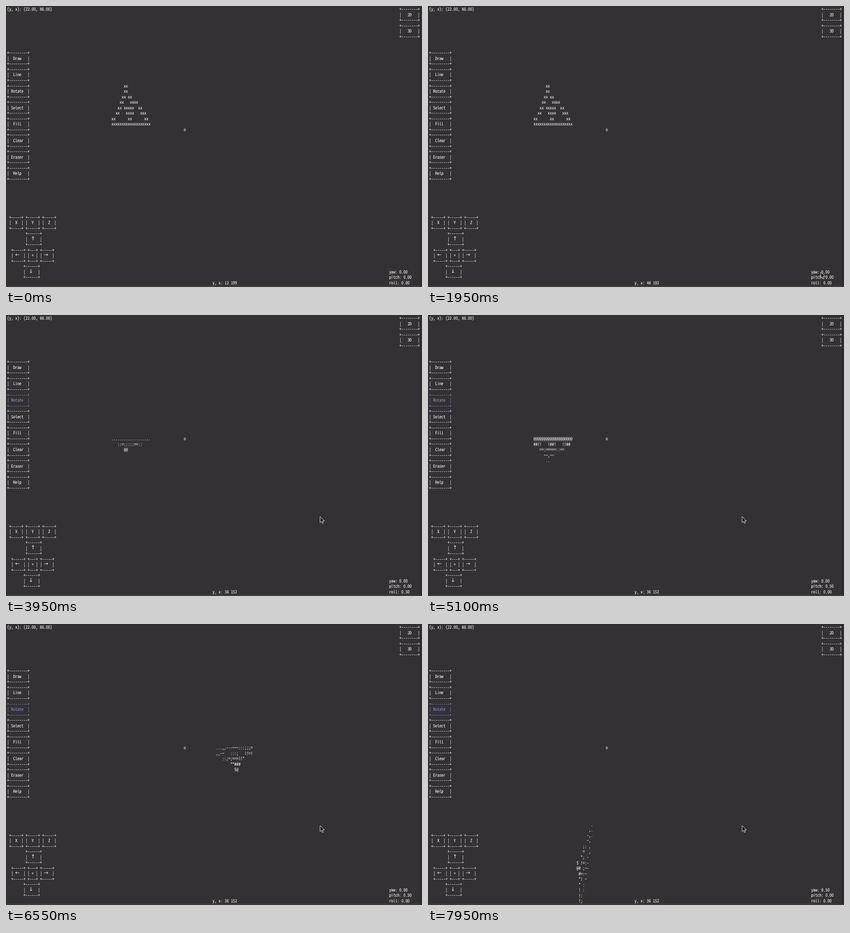
Write an HTML page that moves like this. It is 800 px wide and 541 px high and loops after 8 s.

```html
<!DOCTYPE html>
<html lang="en">
<head>
<meta charset="utf-8">
<title>Terminal sketch pad</title>
<style>
  html, body { margin: 0; width: 100%; height: 100%; overflow: hidden; background: #333133; }
  #stage {
    position: relative; width: 800px; height: 541px; overflow: hidden;
    background: #333133; color: #e6e4e4;
    font: 100px/10.54px "Noto Sans Mono CJK JP", "Noto Sans Mono CJK SC", "Noto Sans Mono", monospace;
    text-rendering: geometricPrecision; font-variant-ligatures: none;
  }
  #stage::after {
    content: ""; position: absolute; inset: 0; border: solid #2d2b2d;
    border-width: 1px 4px 3px 1px; border-bottom-color: #3d3b38;
  }
  pre { position: absolute; margin: 0; font: inherit; white-space: pre; -webkit-text-stroke: .12px; }
  .on { color: #8585b8; }
  .arrow { font-family: "DejaVu Sans", sans-serif; font-size: 10px; }
  #mouse { position: absolute; left: 0; top: 0; overflow: visible; z-index: 2; }
</style>
</head>
<body>
<div id="stage">
  <svg id="mouse" width="10" height="16">
    <path d="M0 0V11.6L2.7 9.2L4.5 13.3L6.4 12.5L4.6 8.5H8.3Z" fill="#161616" stroke="#e6e6e6" stroke-width=".9"/>
  </svg>
</div>
<script>
const LOOP = 8000, STEP = 50;
const CW = 3.95, RH = 10.54, LEFT = 2, TOP = 1;
const ROWS = 51, COLS = 201, CY = 22, CX = 86;
const RAMP = ".,-~:;=!*#$@";
const stage = document.getElementById("stage");
const mouse = document.getElementById("mouse");

function put(row, col, text, cls = "") {
  const el = document.createElement("pre");
  el.className = cls;
  el.style.left = LEFT + col * CW + "px";
  el.style.top = TOP + row * RH + "px";
  el.textContent = text;
  stage.append(el);
  return el;
}

function box(row, col, label) {
  const edge = "+" + "-".repeat(label.length) + "+";
  return put(row, col, `${edge}\n|${label}|\n${edge}`);
}

// Fit the font's advance to the character grid.
const probe = put(0, 0, "x".repeat(10));
const ratio = probe.getBoundingClientRect().width / 1000;
probe.remove();
const size = 8.4 * Math.sqrt(0.5 / ratio);
stage.style.fontSize = size + "px";
stage.style.letterSpacing = CW - ratio * size + "px";

const tools = {};
["  Draw   ", "  Line   ", " Rotate  ", " Select  ", "  Fill   ", "  Clear  ", " Eraser  ", "  Help   "]
  .forEach((label, i) => tools[label.trim()] = box(8 + 3 * i, 0, label));
["2D", "3D"].forEach((name, i) => box(3 * i, 191, `   ${name}   `));
[..."XYZ"].forEach((name, i) => box(38, 1 + 8 * i, `  ${name}  `));
box(41, 9, "      ");
box(44, 2, "     ");
box(44, 10, " + ");
box(44, 16, "     ");
box(47, 8, "      ");
put(42, 11.6, "↑", "arrow");
put(45, 4, "←", "arrow");
put(45, 17.9, "→", "arrow");
put(48, 10.6, "↓", "arrow");
put(0, 0, "(y, x): (22.00, 86.00)");
put(CY, CX, "o");

const figure = put(0, 0, "");
const counter = put(50, 100, "");
const yawText = put(48, 186, "");
const pitchText = put(49, 186, "");
const rollText = put(50, 186, "");

// Triangle, row by row, relative to the pivot.
const points = [];
[
  "      xx",
  "      xx",
  "     xx xx",
  "    xx   xxxx",
  "   xx xxxxx  xx",
  "  xx   xxxx   xxx",
  "xx      xx      xx",
  "x".repeat(19)
].forEach((line, r) => [...line].forEach((ch, c) => {
  if (ch === "x") points.push([51 + c - CX, 14 + r - CY]);
}));

const clamp = (v, lo, hi) => Math.min(hi, Math.max(lo, v));

// A key is tapped, then held: it repeats at a steady rate per ms.
const key = (tap, taps, from, to, count, rate) => t => t < from
  ? clamp(Math.round((t - tap) / 67) + 1, 0, taps)
  : Math.round(count + (Math.min(t, to) - from) * rate);

const rollKey = key(2950, 4, 3450, 4100, 5, 0.0575);
const pitchKey = key(5250, 1, 5550, 6550, 4, 0.052);
const yawKey = key(7250, 1, 7500, 7950, 2, 0.06);

// Pointer strokes: start, end, and where each one leads.
const strokes = [
  { from: 50, to: 250, x: 24, y: 194 },
  { from: 300, to: 450, x: 160, y: 108 },
  { from: 700, to: 1150, x: 396, y: 289 },
  { from: 1600, to: 1850, x: 765, y: 520 },
  { from: 1885, to: 2150, x: 604, y: 388 }
];

function pointer(t) {
  let x = 430, y = 124;
  for (const s of strokes) {
    const u = clamp((t - s.from) / (s.to - s.from), 0, 1) ** 2;
    x += (s.x - x) * u;
    y += (s.y - y) * u;
  }
  return [x, y];
}

function turn(a, b, angle) {
  const c = Math.cos(angle), s = Math.sin(angle);
  return [a * c - b * s, a * s + b * c];
}

function drawFigure(t) {
  // Each key press turns by half a radian.
  const [roll, pitch, yaw] = [rollKey, pitchKey, yawKey].map(turns => turns(t) / 2);
  const solid = points.map(([px, py]) => {
    let x = px, y, z;
    [y, z] = turn(py, 0, roll);
    [z, x] = turn(z, x, pitch);
    [x, y] = turn(x, y, yaw);
    return [x, y, z];
  });
  const depth = solid.map(p => p[2]);
  const near = Math.max(...depth), far = Math.min(...depth);
  const grid = Array.from({ length: ROWS }, () => Array(COLS).fill(" "));
  for (const [x, y, z] of solid) {
    const row = Math.floor(CY + y), col = Math.floor(CX + x);
    if (row < 0 || row >= ROWS || col < 0 || col >= COLS) continue;
    grid[row][col] = roll ? RAMP[Math.floor((z - far) / (near - far) * 11 + 1e-9)] : "x";
  }
  figure.textContent = grid.map(r => r.join("").trimEnd()).join("\n");
}

const half = on => on ? "0.50" : "0.00";

function draw(t) {
  drawFigure(t);
  tools.Select.className = t >= 300 && t < 1500 ? "on" : "";
  tools.Rotate.className = t >= 2850 ? "on" : "";
  rollText.textContent = "roll: " + half(t >= 2450 && t < 4700);
  pitchText.textContent = "pitch: " + half(t >= 5100 && t < 6750);
  yawText.textContent = "yaw: " + half(t >= 6950);

  const [x, y] = pointer(t);
  mouse.style.display = t < 50 ? "none" : "";
  mouse.style.transform = `translate(${x}px, ${y}px)`;
  // The readout trails the pointer by half a step.
  const [lx, ly] = pointer(t - STEP / 2);
  const cell = `${Math.floor((ly - TOP) / RH)} ${Math.floor((lx - LEFT) / CW)}`;
  counter.textContent = "y, x: " + (t < 50 ? "12 199" : cell);
}

const start = performance.now();
let last = -1;
function tick() {
  const t = Math.floor((performance.now() - start) % LOOP / STEP) * STEP;
  if (t !== last) draw(last = t);
  requestAnimationFrame(tick);
}
tick();
</script>
</body>
</html>
```
